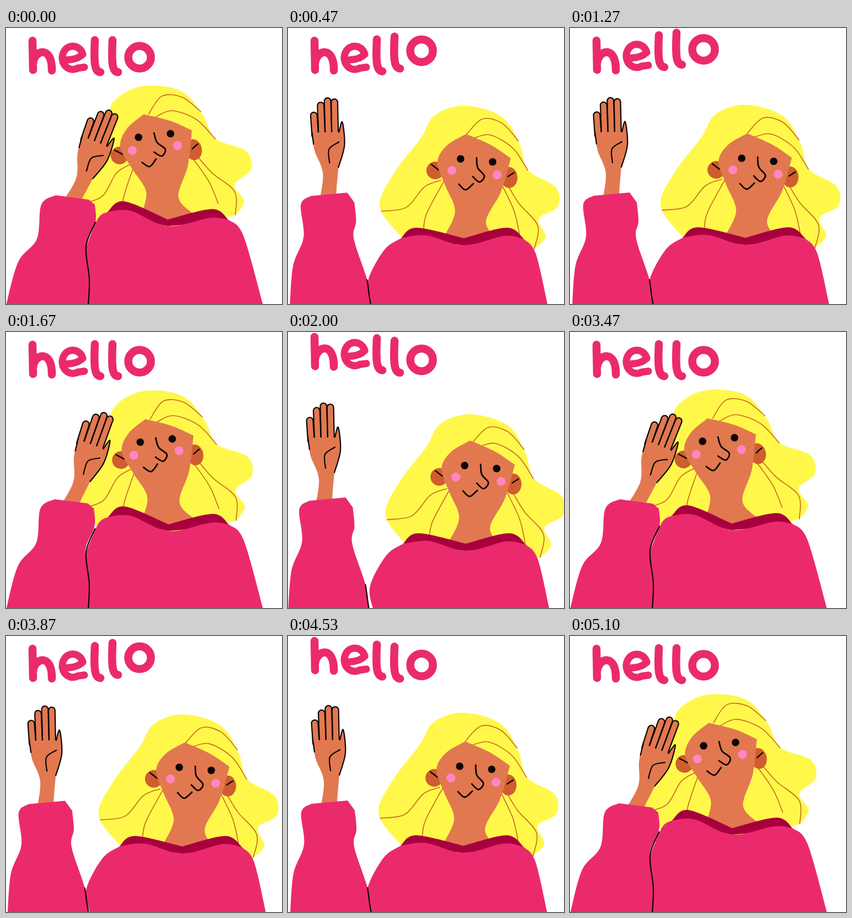
An HTML page with a canvas for the animation above (5.13 s loop, 500x500 px).

```html
<!DOCTYPE html>
<html lang="en">
<head>
<meta charset="utf-8">
<title>hello</title>
<style>
html, body { margin: 0; width: 100%; height: 100%; overflow: hidden; background: #fff; }
canvas { display: block; width: 100vw; height: 100vh; }
</style>
</head>
<body>
<canvas id="stage" width="500" height="500" role="img" aria-label="hello"></canvas>
<script>
const ctx = document.getElementById('stage').getContext('2d');
const PINK = '#eb2a6e', DARK = '#a8003e', SKIN = '#e27850', EAR = '#cf5d30';
const HAIR = '#fff84a', STRAND = '#c8661f', CHEEK = '#ff86c4', INK = '#0a0505';
const CYCLE = 1710, OVERSHOOT = .17;

const lerp = (a, b, k) => a + (b - a) * k;
const clamp = v => Math.min(1, Math.max(0, v));
const mix = (a, b, k) => a.map((v, i) => lerp(v, b[i], k));
const easeSine = u => (1 - Math.cos(Math.PI * clamp(u))) / 2;
const easePow = (u, n) => u < .5 ? .5 * (2 * u) ** n : 1 - .5 * (2 - 2 * u) ** n;

// Smooth curve through a few key points
function curve(p, first) {
  const last = p.length / 2 - 1;
  const at = i => { i = Math.min(last, Math.max(0, i)); return [p[2 * i], p[2 * i + 1]]; };
  if (first) ctx.moveTo(p[0], p[1]); else ctx.lineTo(p[0], p[1]);
  for (let i = 0; i < last; i++) {
    const [a, b, c, d] = [at(i - 1), at(i), at(i + 1), at(i + 2)];
    ctx.bezierCurveTo(b[0] + (c[0] - a[0]) / 6, b[1] + (c[1] - a[1]) / 6,
      c[0] - (d[0] - b[0]) / 6, c[1] - (d[1] - b[1]) / 6, c[0], c[1]);
  }
}
function fill(color, ...parts) {
  ctx.beginPath();
  parts.forEach((p, i) => curve(p, i === 0));
  ctx.closePath();
  ctx.fillStyle = color;
  ctx.fill();
}
function pen(color, width, trace) {
  ctx.strokeStyle = color;
  ctx.lineWidth = width;
  ctx.lineCap = ctx.lineJoin = 'round';
  ctx.beginPath();
  trace();
  ctx.stroke();
}
function line(color, width, ...parts) {
  for (const p of parts) pen(color, width, () => curve(p, true));
}
function oval(color, x, y, rx, ry = rx) {
  ctx.beginPath();
  ctx.ellipse(x, y, rx, ry, 0, 0, 7);
  ctx.fillStyle = color;
  ctx.fill();
}

// swing: 0 = hand at the ear, 1 = waving; over: 0..1 push beyond the wave
function pose(t) {
  let k;
  if (t < 310) k = (1 + OVERSHOOT) * easeSine((t - 60) / 250);
  else if (t < 1350) k = 1 + OVERSHOOT * (1 - easeSine((t - 310) / 220));
  else k = 1 - easePow((t - 1350) / (CYCLE - 1350), 1.6);
  return { swing: Math.min(1, k), over: Math.max(0, k - 1) / OVERSHOOT };
}

// Rigid part, drawn as in the wave, turned around a pivot that travels
function part(listen, wave, degrees, drift, swing, over, draw) {
  const [x, y] = mix(listen, wave, swing);
  ctx.save();
  ctx.translate(x + drift[0] * over, y + drift[1] * over);
  ctx.rotate(degrees * (1 - swing) * Math.PI / 180);
  ctx.translate(-wave[0], -wave[1]);
  draw();
  ctx.restore();
}

function drawHair() {
  fill(HAIR,
    [206, 380, 164, 322, 190, 261, 238, 198, 264, 156, 318, 139, 385, 159, 417, 208,
     433, 256, 483, 287, 486, 322, 452, 344, 464, 376, 445, 398],
    [320, 412]);
  line(STRAND, 1.6,
    [167, 330, 212, 323, 245, 286, 275, 274],
    [280, 276, 249, 334, 243, 366],
    [384, 280, 407, 329, 417, 372],
    [394, 280, 416, 316, 450, 356, 444, 398],
    [321, 191, 350, 163, 386, 171, 415, 203],
    [333, 198, 364, 192, 405, 216, 432, 256]);
}

function drawFace() {
  oval(EAR, 265, 257, 16);
  oval(EAR, 399, 270, 15, 19);
  line(INK, 2.4, [258, 246, 271, 256], [397, 268, 408, 261]);
  fill(SKIN,
    [321, 191, 286, 212, 269, 242, 283, 284, 301, 330, 284, 372],
    [318, 398],
    [380, 386, 357, 350, 384, 296, 402, 235],
    [402, 235, 366, 211, 321, 191]);
}

function drawFeatures() {
  for (const side of [0, 1]) {
    oval(CHEEK, 295 + 82 * side, 257 + 8 * side, 8);
    oval(INK, 311 + 58 * side, 236 + 5.5 * side, 6.8);
  }
  line(INK, 2.8,
    [340, 234, 342, 252, 354, 267, 345, 278, 333, 268],
    [308, 282, 320, 292, 334, 281]);
}

function drawHand() {
  for (let i = 0; i < 4; i++) {
    const finger = [51 + 12 * i, 194, 48.5 + 12.4 * i, 131.5 + 5 * (i - 2.3) ** 2];
    line(INK, 14, finger);
    line(SKIN, 9.6, finger);
  }
  const thumb = [94, 188, 100, 170, 104, 212, 93, 252];
  fill(SKIN, [57, 322, 65, 264, 50, 222, 45, 189], [94, 188], thumb, [90, 285, 88, 322]);
  line(INK, 2.2, thumb, [45, 188, 48, 210], [94, 206, 76, 219, 77, 244]);
}

function drawBody(k) {
  const m = (a, b) => mix(a, b, k);
  const hem = m([184, 333, 225, 331, 293, 359, 370, 344, 404, 348],
                [204, 380, 250, 375, 318, 393, 390, 376, 427, 382]);
  fill(DARK,
    m([184, 333, 214, 314, 293, 347], [204, 380, 232, 361, 318, 380]),
    m([293, 347, 374, 328, 404, 349], [318, 380, 396, 361, 427, 382]),
    hem.slice(4, 6));
  fill(PINK, hem,
    m([404, 348, 430, 376, 466, 503], [427, 382, 448, 408, 470, 503]),
    m([149, 503, 138, 430, 164, 350, 184, 333], [151, 503, 144, 458, 173, 402, 204, 380]));
}

function drawSleeve(k) {
  const m = (a, b) => mix(a, b, k);
  fill(PINK,
    m([0, 503, 22, 424, 56, 382, 64, 320, 90, 303], [4, 503, 10, 430, 29, 378, 24, 320, 42, 304]),
    m([150, 311, 161, 320], [108, 298, 121, 316]),
    m([161, 320, 162, 352, 145, 396, 151, 455, 149, 503], [121, 316, 124, 350, 120, 382, 144, 456, 151, 503]));
  line(INK, 2.2, m([162, 352, 145, 396, 151, 455, 149, 503], [144, 456, 146, 470, 148, 486, 151, 503]));
}

const tall = x => () => {
  ctx.moveTo(x, 22);
  ctx.bezierCurveTo(x - 2, 62, x - 1, 79, x + 10, 80);
};
const LETTERS = [
  () => {
    ctx.moveTo(48, 23);
    ctx.lineTo(49, 76);
    ctx.moveTo(49, 64);
    ctx.bezierCurveTo(52, 38, 84, 32, 83, 77);
  },
  () => {
    ctx.moveTo(104, 58);
    ctx.quadraticCurveTo(130, 58, 138, 48);
    ctx.ellipse(121, 54, 19, 21, 0, -.3, 1.1, true);
    ctx.lineTo(142, 71);
  },
  tall(161),
  tall(193),
  () => ctx.ellipse(242, 53, 20.5, 20.5, 0, 0, 7)
];

// Letters hop one after the other, twice per cycle
function drawText(t) {
  LETTERS.forEach((trace, i) => {
    const u = clamp((t - 60 - 38 * i) / 365) ** 1.3;
    ctx.save();
    ctx.translate(0, -14.5 * Math.sin(Math.PI * u) ** 2);
    pen(PINK, i === 1 ? 13 : 14.5, trace);
    ctx.restore();
  });
}

function draw(now) {
  const t = now % CYCLE;
  const { swing, over } = pose(t);
  const arm = swing ** .8;
  ctx.fillStyle = '#fff';
  ctx.fillRect(0, 0, 500, 500);
  drawText(t % (CYCLE / 2));
  part([294, 220], [345, 260], -10, [14, 11], swing, over, drawHair);
  part([285, 220], [345, 260], -10, [10, 6], swing, over, drawFace);
  part([269, 194.5], [340, 238.5], -11.8, [10, 6.5], swing, over, drawFeatures);
  part([0, 0], [0, 0], 0, [5, 4], swing, over, () => drawBody(swing));
  part([122, 310], [75, 300], 23, [-10, 3], arm, over, drawHand);
  part([0, 0], [0, 0], 0, [-4, 2], swing, over, () => drawSleeve(swing));
}

const start = performance.now();
function tick() {
  draw(performance.now() - start);
  requestAnimationFrame(tick);
}
tick();
</script>
</body>
</html>
```
